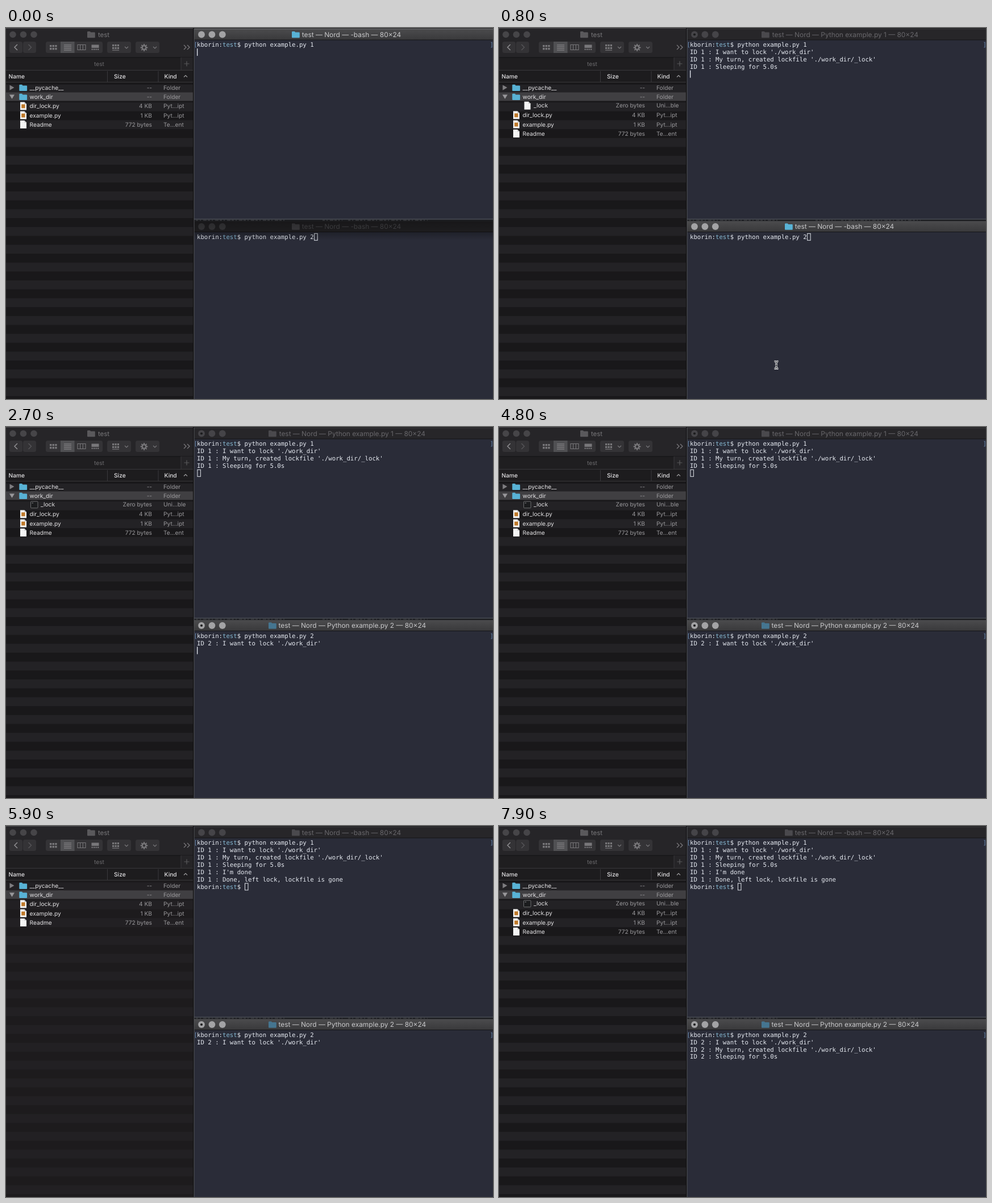
These frames come from a looping animation (857x654 px, 8000 ms). An HTML page:

```html
<!DOCTYPE html>
<html lang="en">
<head>
<meta charset="utf-8">
<title>Directory lock demo</title>
<style>
  html, body { margin: 0; width: 100%; height: 100%; overflow: hidden; background: #1a191b; }
  svg { display: block; width: 857px; height: 654px; }
  text { white-space: pre; text-rendering: geometricPrecision; }
  .ui { font: 10.2px Inter, "Open Sans", sans-serif; fill: #e4e3e5; }
  .dim { fill: #9a999c; }
  .head { font-weight: 500; }
  .title { font: 11.9px Inter, "Open Sans", sans-serif; text-anchor: middle; }
  .mono { font: 10.68px "DejaVu Sans Mono", "Liberation Mono", monospace; fill: #e6eaf1; }
  .path { fill: #86b8d2; }
  .mark { fill: #6a8bb0; }
  .end { text-anchor: end; }
  .mid { text-anchor: middle; }
</style>
</head>
<body>
<svg id="stage" viewBox="0 0 857 654" xmlns="http://www.w3.org/2000/svg"></svg>
<script>
const LOOP = 8000;
const USER = 'kborin';
const CELL = 6.43, LINE = 12.87;
const stage = document.getElementById('stage');

// ---- drawing helpers ----
const rect = (x, y, w, h, fill, more = '') =>
  `<rect x="${x}" y="${y}" width="${w}" height="${h}" fill="${fill}" ${more}/>`;
const text = (x, y, cls, s, more = '') =>
  `<text x="${x}" y="${y}" class="${cls}" ${more}>${s}</text>`;
const line = (d, color, w = 1.2) =>
  `<path d="${d}" fill="none" stroke="${color}" stroke-width="${w}"/>`;
const group = (id, inner, more = '') => `<g id="${id}" ${more}>${inner}</g>`;
const repeat = (n, f) => Array.from({ length: n }, (_, i) => f(i)).join('');
const folder = (x, y, more = 'fill="#58b2d5"') =>
  `<path d="M${x} ${y + 1.2}q0-1.2 1.2-1.2h3.6l1.4 1.6h6.4q1.2 0 1.2 1.2v7.4q0 1-1 1h-11.8q-1 0-1-1z" ${more}/>`;
const page = (x, y) =>
  `<path d="M${x} ${y}h7.5l3.5 3.5v10.5h-11z" fill="#f4f4f4"/><path d="M${x + 7.5} ${y}v3.5h3.5z" fill="#b9b9bb"/>`;

// ---- file browser ----
const ICON = '#78777a';
const button = (x, w) => rect(x, 24, w, 20, '#343336', 'rx="3.5"');

function toolbar() {
  const dots = [12, 30.5, 49].map(x => `<circle cx="${x}" cy="11.5" r="5.8" fill="#464548"/>`).join('');
  const tiles = (x, y, s, cols, rows) => repeat(cols * rows, i =>
    rect(x + (i % cols) * (s + 1.2), y + Math.floor(i / cols) * (s + 1.6), s, s, ICON));
  const gear = repeat(8, i => `<path d="M243 28v3" stroke="${ICON}" stroke-width="2" transform="rotate(${i * 45} 243 34.5)"/>`)
    + `<circle cx="243" cy="34.5" r="3.4" fill="none" stroke="${ICON}" stroke-width="2.4"/>`;
  const drop = x => line(`M${x - 3} 33l3 3 3-3`, ICON);
  return rect(0, 0, 329, 52, '#262528') + rect(0, 0, 329, 1, '#48474a') + dots
    + folder(143, 6, 'fill="#5a595c"') + text(172, 15.8, 'title', 'test', 'fill="#78777a" style="font-size:11.5px"')
    + button(6, 23) + button(30, 23) + button(70, 100) + button(178, 42) + button(228, 42)
    + rect(96, 24, 24.5, 20, '#505053')
    + line('M20 29l-5 5 5 5', '#8f8e91', 1.5) + line('M39.500 29l5 5-5 5', '#555457', 1.5)
    + tiles(77, 30, 3.4, 3, 2)
    + repeat(4, i => rect(102, 29.500 + i * 3, 13, 1, '#8f8e91'))
    + line('M126 29.500h14v9h-14zM130.600 29.500v9M135.300 29.500v9', ICON, 1.1)
    + rect(150.5, 29.5, 13, 5.5, ICON) + tiles(150.5, 36.5, 2.3, 4, 1)
    + tiles(187, 29, 3.2, 3, 2) + rect(187, 38.500, 12, 1.2, ICON) + drop(212)
    + gear + drop(262)
    + line('M313 30l4 4-4 4M319 30l4 4-4 4', '#79787b', 1.3);
}

function tabsAndHeader() {
  return rect(0, 52, 329, 23, '#1f1e20') + rect(0, 51.5, 329, 1, '#111012') + rect(308, 52, 21, 22, '#252427')
    + rect(307.5, 52, 1, 23, '#3a393c')
    + text(164, 66.5, 'ui mid', 'test', 'style="fill:#6c6b6e"')
    + line('M313.500 63h9M318 58.500v9', '#5b5a5d')
    + rect(0, 74, 329, 1, '#39383b') + rect(0, 75, 329, 21, '#1d1c1e')
    + rect(178, 76, 1, 19, '#3a393c') + rect(267.5, 76, 1, 19, '#3a393c') + rect(0, 95, 329, 1, '#39383b')
    + text(4.5, 88.7, 'ui head', 'Name') + text(190, 88.7, 'ui head', 'Size') + text(278.5, 88.7, 'ui head', 'Kind')
    + line('M313 86.500l3-3 3 3', '#a09fa2', 1.1);
}

const row = (y, x, name, size, kind, icon) => icon
  + text(x, y + 3.7, 'ui', name) + text(257, y + 3.7, 'ui dim end', size) + text(277, y + 3.7, 'ui dim', kind);

const script = y => page(25, y - 7) + rect(27.2, y - 3, 6.4, 6.8, '#c07a2a');

function browser() {
  const stripes = repeat(18, i => rect(0, 99.8 + i * 31.38, 329, 15.69, '#232225'));
  const lockIcon = group('lockPage', page(44.5, 129.7))
    + group('lockApp', rect(43.5, 131.2, 12.5, 11.6, '#1b1c1e', 'rx="1" stroke="#77787a" stroke-width=".9"')
      + line('M45.500 134h2.500', '#8d8e90', 1));
  return rect(0, 0, 329, 654, '#19181a') + stripes
    + rect(0, 96, 329, 558, '#201f21', 'id="wash"')
    + `<g clip-path="url(#underSelection)">`
    + group('lockRow', row(136.7, 61, '_lock', 'Zero bytes', 'Uni…ble', lockIcon))
    + group('below', row(137.5, 41.5, 'dir_lock.py', '4 KB', 'Pyt…ipt', script(137.5))
      + row(153.8, 41.5, 'example.py', '1 KB', 'Pyt…ipt', script(153.8))
      + row(170, 41.5, 'Readme', '772 bytes', 'Te…ent', page(25, 163)))
    + '</g>'
    + rect(0, 113.5, 329, 15, '#403f42')
    + row(105, 41.5, '__pycache__', '--', 'Folder', folder(23.3, 99.8) + '<path d="M6.500 100.500l8 4.600-8 4.600z" fill="#7e7d80"/>')
    + row(121, 41.5, 'work_dir', '--', 'Folder', folder(23.3, 115.8) + '<path d="M6 117.500h9l-4.500 7.500z" fill="#98979a"/>')
    + toolbar() + tabsAndHeader();
}

// ---- terminals ----
const prompt = cmd => `${USER}:<tspan class="path">test</tspan>$ ${cmd}`;

function terminal(id, top, height) {
  const n = id.slice(1);
  const base = top + 32.3;
  const out = (i, s) => text(336, base + i * LINE, 'mono', s, `id="${id}l${i}"`);
  const says = s => `ID ${n} : ${s}`;
  const lines = out(0, prompt('python example.py ' + n))
    + out(1, says("I want to lock './work_dir'"))
    + out(2, says("My turn, created lockfile './work_dir/_lock'"))
    + out(3, says('Sleeping for 5.0s'))
    + (n === '1' ? out(4, says("I'm done")) + out(5, says('Done, left lock, lockfile is gone')) + out(6, prompt('')) : '');
  const marks = text(330.5, base, 'mono mark', '[') + text(851.5, base, 'mono mark', ']');
  const knobs = repeat(3, i => `<circle cx="${344 + i * 18.4}" cy="${top + 10.5}" r="5.9"/>`);
  return rect(331, top, 526, height, '#2a2c38')
    + group(id + 'marks', marks) + lines
    + rect(336, 0, 1.3, 13, '#e6eaf1', `id="${id}bar"`)
    + rect(336.7, 0, 5.5, 12, 'none', `id="${id}box" stroke="#e0e4ea" stroke-width="1"`)
    + rect(331, top, 526, 20, '', `id="${id}head"`) + rect(331, top, 526, 1, '', `id="${id}edge"`)
    + rect(331, top + 19.5, 526, 1, '#151517')
    + group(id + 'knobs', knobs) + `<circle id="${id}dot" cx="344" cy="${top + 10.5}" r="2.1" fill="#1b1b1d"/>`
    + folder(0, top + 5, `id="${id}icon"`) + text(608, top + 14.9, 'title', '', `id="${id}title"`);
}

function seam() {
  const bits = (x, w) => `<path d="M${x} 339h${w}" stroke="#74767b" stroke-width="1.2" stroke-dasharray="4 3 2 4 6 2" opacity=".5"/>`;
  return rect(331, 336.5, 526, 4, '#1b1c20') + rect(331, 336.5, 526, 1, '#60646e')
    + bits(334, 158) + bits(557, 35) + bits(602, 140);
}

const IBEAM = 'M-3.500-6.500Q-.5-6.500 0-4.500Q.5-6.500 3.500-6.500M0-4.500V4.500M-3.500 6.500Q-.5 6.500 0 4.500Q.5 6.500 3.500 6.500M-2 1h4';

stage.innerHTML = `<defs>
  <clipPath id="underSelection"><rect y="128.5" width="329" height="526"/></clipPath>
  <linearGradient id="lit" x2="0" y2="1"><stop stop-color="#4c4c4e"/><stop offset="1" stop-color="#39393b"/></linearGradient>
  <linearGradient id="shade" x2="0" y2="1"><stop stop-color="#000" stop-opacity=".4"/><stop offset=".6" stop-color="#000" stop-opacity=".25"/><stop offset="1" stop-color="#000" stop-opacity="0"/></linearGradient>
  </defs>`
  + browser() + rect(329, 0, 2, 654, '#121113')
  + terminal('t1', 1, 337) + terminal('t2', 339.5, 315)
  + rect(331, 340, 526, 34, 'url(#shade)', 'id="cast"')
  + seam() + rect(330.5, 1, 1, 653, '#55565b') + rect(331, 0, 526, 1, '#1a1a1c')
  + group('mouse', line(IBEAM, '#f2f3f5', 3.2) + line(IBEAM, '#15161a', 1));

// ---- motion ----
const el = id => document.getElementById(id);
const show = (id, on) => el(id).setAttribute('visibility', on ? 'visible' : 'hidden');
const set = (id, attrs) => { for (const k in attrs) el(id).setAttribute(k, attrs[k]); };
const clamp = v => Math.max(0, Math.min(1, v));
const ease = v => v * v * (3 - 2 * v);
const ramp = (t, a, b) => ease(clamp((t - a) / (b - a)));

const CLICK = 700, START = 100, FINISH = 5400, ENTER = 1800, WAIT = 2200, TURN = 6200;
const BLINK = [1000, 1300, 1800, 2750, 3250, 3750, 4300, 4800, 5400, 5900, 6200, 6800, 7350, 7900];
const MOUSE = [[150, 506, 235], [400, 505, 264], [500, 500, 390], [650, 488, 594]];

// Stripes blend together while rows slide, then settle.
const wash = (t, a, b, peak) => peak * (t < a ? 0 : 1 - clamp((t - b) / 300));

function mouseAt(t) {
  const i = MOUSE.findIndex(k => k[0] > t);
  if (i < 1) return i ? MOUSE[MOUSE.length - 1].slice(1) : MOUSE[0].slice(1);
  const [a, b] = [MOUSE[i - 1], MOUSE[i]];
  const f = (t - a[0]) / (b[0] - a[0]);
  return [a[1] + (b[1] - a[1]) * f, a[2] + (b[2] - a[2]) * f];
}

function drawHead(id, active, running, faint) {
  const n = id.slice(1);
  const ink = active ? '#c9c9cb' : faint ? '#56565a' : '#68676b';
  el(id + 'title').textContent = `test — Nord — ${running ? 'Python example.py ' + n : '-bash'} — 80×24`;
  set(id + 'title', { x: running ? 609.3 : 608, fill: ink });
  set(id + 'head', { fill: active ? 'url(#lit)' : '#272629' });
  set(id + 'edge', { fill: active ? '#747477' : '#3d3c3f' });
  set(id + 'knobs', { fill: active ? '#a3a3a5' : '#454448' });
  set(id + 'icon', {
    fill: active ? (running ? '#457590' : '#58b2d5') : '#4a494d',
    transform: `translate(${running ? 462 : 503} 0)`
  });
  show(id + 'dot', running);
}

function drawCursor(id, top, line, col, active, on) {
  const x = 336 + col * CELL, y = top + 22.2 + line * LINE;
  set(id + 'bar', { x, y });
  set(id + 'box', { x: x + .9, y: y + .6 });
  show(id + 'bar', active && on);
  show(id + 'box', !active);
}

function draw(t) {
  const first = t >= START && t < FINISH, second = t >= WAIT;
  const front = t < CLICK;
  drawHead('t1', front, first, false);
  drawHead('t2', !front, second, true);
  show('cast', front);

  const count1 = t < START ? 1 : t < FINISH ? 4 : 7;
  for (let i = 0; i < 7; i++) show('t1l' + i, i < count1);
  const count2 = t < WAIT ? 1 : t < TURN ? 2 : 4;
  for (let i = 0; i < 4; i++) show('t2l' + i, i < count2);
  show('t2marks', t >= ENTER);

  // Keyboard focus reaches the lower window a little after the click.
  const lower = t >= 1000;
  const lit = BLINK.filter(b => b <= t).length % 2 === 1;
  const steady = t >= ENTER && t < 2750;
  const done = t >= FINISH;
  drawCursor('t1', 1, done ? 6 : count1, done ? 13 : 0, !lower, true);
  drawCursor('t2', 339.5, t < ENTER ? 0 : count2 === 1 ? 1 : count2, t < ENTER ? 32 : 0, lower, lit || steady);

  const open = ramp(t, 270, 540) - ramp(t, 5640, 5890) + ramp(t, 6760, 7060);
  set('lockRow', { transform: `translate(0 ${-16 * (1 - open)})` });
  set('below', { transform: `translate(0 ${16 * open})` });
  show('lockRow', open > .01);
  const app = (t >= 1200 && t < 6300) || t >= 7700;
  set('lockPage', { display: app ? 'none' : 'inline' });
  set('lockApp', { display: app ? 'inline' : 'none' });
  set('wash', { opacity: Math.max(
    t < 1000 ? wash(t, 280, 480, .9) : 0,
    t < 6500 ? wash(t, 5680, 5850, .6) : 0,
    wash(t, 6780, 7060, .9)) });

  const [mx, my] = mouseAt(t);
  set('mouse', { transform: `translate(${mx} ${my})` });
  show('mouse', t >= MOUSE[0][0] && t < ENTER);
}

const begin = performance.now();
function tick() {
  draw((performance.now() - begin) % LOOP);
  requestAnimationFrame(tick);
}
tick();
</script>
</body>
</html>
```
